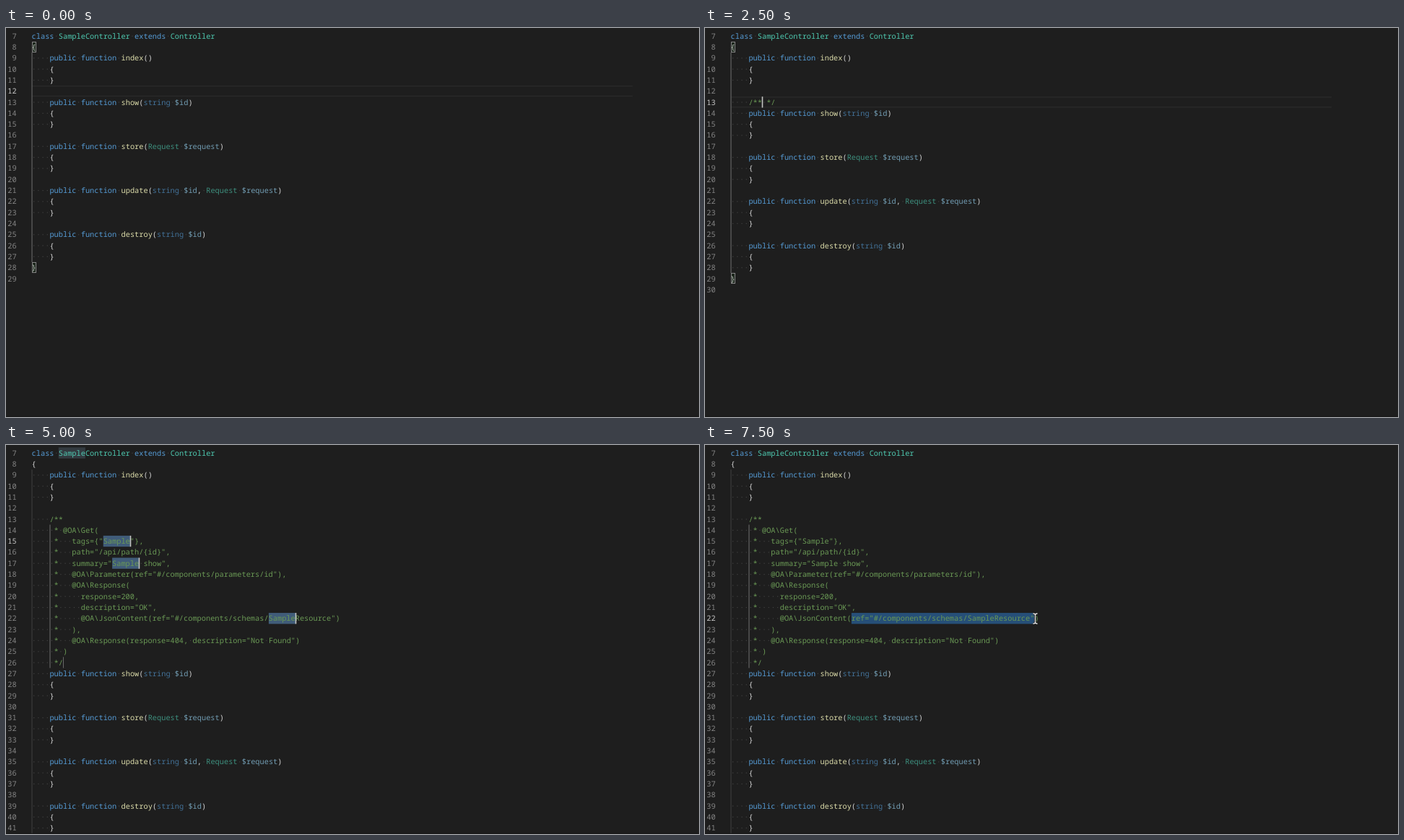
Recreate the animation shown at these times as an HTML page with a canvas. Size 960 by 540 pixels, loop 8 s.

```html
<!DOCTYPE html>
<html lang="en">
<head>
<meta charset="utf-8">
<title>Code editor</title>
<style>
html, body { margin: 0; width: 100%; height: 100%; overflow: hidden; background: #1e1e1e; }
canvas { display: block; }
</style>
</head>
<body>
<canvas id="stage" width="960" height="540"></canvas>
<script>
const ctx = document.getElementById('stage').getContext('2d');
const LOOP = 8000, STEP = 500;
const X0 = 35.6, Y0 = 3.4, CW = 6.195, LH = 15.31, FIRST = 7;
const FONT = '10.325px "Noto Sans Mono", "DejaVu Sans Mono", monospace';
const C = {
  bg: '#1e1e1e', text: '#d4d4d4', keyword: '#569cd6', type: '#4ec9b0',
  fn: '#dcdcaa', variable: '#9cdcfe', comment: '#6a9955',
  num: '#858585', numActive: '#c6c6c6', dot: '#424242',
  guide: '#404040', guideActive: '#707070', cursor: '#c4c5c3'
};

const method = sig => ['    public function ' + sig, '    {', '    }'];
const head = ['class SampleController extends Controller', '{', ...method('index()'), ''];
const tail = [
  ...method('show(string $id)'), '',
  ...method('store(Request $request)'), '',
  ...method('update(string $id, Request $request)'), '',
  ...method('destroy(string $id)'), '}', ''
];
const doc = [
  '/**',
  ' * @OA\\Get(',
  ' *   tags={"Sample"},',
  ' *   path="/api/path/{id}",',
  ' *   summary="Sample show",',
  ' *   @OA\\Parameter(ref="#/components/parameters/id"),',
  ' *   @OA\\Response(',
  ' *     response=200,',
  ' *     description="OK",',
  ' *     @OA\\JsonContent(ref="#/components/schemas/SampleResource")',
  ' *   ),',
  ' *   @OA\\Response(response=404, description="Not Found")',
  ' * )',
  ' */'
].map(s => '    ' + s);
const withLines = lines => [...head, ...lines, ...tail];

const colX = c => X0 + c * CW;
const rowY = n => Y0 + (n - FIRST) * LH;

function box(color, x, y, w, h) {
  ctx.fillStyle = color;
  ctx.fillRect(x, y, w, h);
}
const mark = (color, line, from, to) =>
  box(color, colX(from), rowY(line), (to - from) * CW, LH);
const caret = (line, col) =>
  box(C.cursor, Math.round(colX(col)) - 0.3, rowY(line), 1.6, LH);

function bracket(line) {
  const x = Math.round(colX(0)) + 0.5, y = Math.round(rowY(line)) + 0.5;
  box('rgba(0,100,0,.1)', x, y, 5, 14);
  ctx.strokeStyle = '#858585';
  ctx.lineWidth = 1;
  ctx.strokeRect(x, y, 5, 14);
}

function currentLine(line) {
  for (const y of [rowY(line), rowY(line + 1) - 1.4]) box('#292929', 36, y, 832, 1.4);
}

function tokenColor(word, line) {
  if (/^(class|extends|public|function|string)$/.test(word)) return C.keyword;
  if (/^(SampleController|Controller|Request)$/.test(word)) return C.type;
  if (word[0] === '$') return C.variable;
  return /^\w/.test(word) && line.includes('function') ? C.fn : C.text;
}

function drawLine(line, n, inComment) {
  const base = rowY(n) + 11.3;
  const isDoc = /^\s*(\/\*|\*)/.test(line);
  const green = inComment || isDoc;
  const parts = isDoc ? /\S+/g : /\$?\w+|[^\s\w$]+/g;
  for (const m of line.matchAll(parts)) {
    const unused = !isDoc && /^(string|Request|\$\w+)$/.test(m[0]);
    ctx.globalAlpha = unused ? 0.667 : 1;
    ctx.fillStyle = green ? C.comment : tokenColor(m[0], line);
    ctx.fillText(m[0], colX(m.index), base);
  }
  ctx.globalAlpha = 1;
  for (const m of line.matchAll(/ /g))
    box(C.dot, colX(m.index + 0.5) - 0.6, rowY(n) + 7.2, 1.2, 1.2);
}

function drawNumber(n, active) {
  ctx.fillStyle = active ? C.numActive : C.num;
  ctx.textAlign = 'right';
  ctx.fillText(n, 14.6, rowY(n) + 11.3);
  ctx.textAlign = 'left';
}

function pointer(x, y) {
  ctx.lineCap = 'butt';
  for (const [color, w] of [['#222', 3], ['#e4e4e4', 1.3]]) {
    ctx.strokeStyle = color;
    ctx.lineWidth = w;
    ctx.beginPath();
    ctx.moveTo(x, y - 6);
    ctx.lineTo(x, y + 6);
    for (const s of [-1, 1]) {
      ctx.moveTo(x - 3, y + 7 * s);
      ctx.quadraticCurveTo(x, y + 7 * s, x, y + 5 * s);
      ctx.quadraticCurveTo(x, y + 7 * s, x + 3, y + 7 * s);
    }
    ctx.stroke();
  }
}

// Editor state at a given time.
function stateAt(t) {
  if (t < 1500) return { lines: withLines([]).filter((s, i) => i >= 0), active: 12, current: true,
    brackets: true, carets: t < 500 ? [] : [[12, 0]] };
  if (t < 3000) {
    const typed = t < 2000 ? '' : t < 2500 ? '/*' : '/** */';
    const col = 4 + Math.min(typed.length, 3);
    return { lines: withLines(['    ' + typed]), active: 13, current: true,
      brackets: true, open: typed === '/*', carets: [[13, col]] };
  }
  const s = { lines: withLines(doc), doc: true, carets: [] };
  if (t < 5500) {
    const fields = [[15, 16], [17, 18], [22, 53]];
    const lit = t % 1000 < STEP;
    return { ...s, active: 15, fields, carets: lit ? fields.map(([n, c]) => [n, c + 6]) : [] };
  }
  if (t < 6000) return { ...s, active: 22, current: true, brackets: true, mouse: 215 };
  return { ...s, active: 22, selected: true, mouse: t < 6500 ? 461 : 457.5 };
}

function draw(t) {
  const s = stateAt(t);
  const last = FIRST + s.lines.length - 1;
  const close = last - 1;
  box(C.bg, 0, 0, 960, 540);
  ctx.font = FONT;
  ctx.textRendering = 'geometricPrecision';
  ctx.textBaseline = 'alphabetic';

  if (s.current) currentLine(s.active);
  if (s.fields) {
    mark('#333a40', 7, 6, 12);
    for (const [n, c] of s.fields) mark('#405c79', n, c, c + 6);
    box('#6a6a6a', colX(7), rowY(26), 1, LH);
  }
  if (s.selected) mark('#264f78', 22, 27, 68);

  s.lines.forEach((line, i) => {
    const n = FIRST + i;
    if (rowY(n) > 538) return;
    drawNumber(n, n === s.active);
    drawLine(line, n, s.open && n > 13);
  });

  box(s.doc ? C.guide : C.guideActive, 35.5, rowY(9), 1, rowY(close) - rowY(9));
  if (s.doc) box(C.guideActive, 60.5, rowY(14), 1, rowY(27) - rowY(14));
  if (s.brackets) [8, close].forEach(bracket);
  for (const [n, c] of s.carets) caret(n, c);
  if (s.mouse) pointer(s.mouse, 241);
  box('rgba(0,0,0,.2)', 0, 538.5, 960, 1.5);
}

function tick(now) {
  draw(Math.floor((now % LOOP) / STEP) * STEP);
  requestAnimationFrame(tick);
}
draw(0);
requestAnimationFrame(tick);
</script>
</body>
</html>
```
